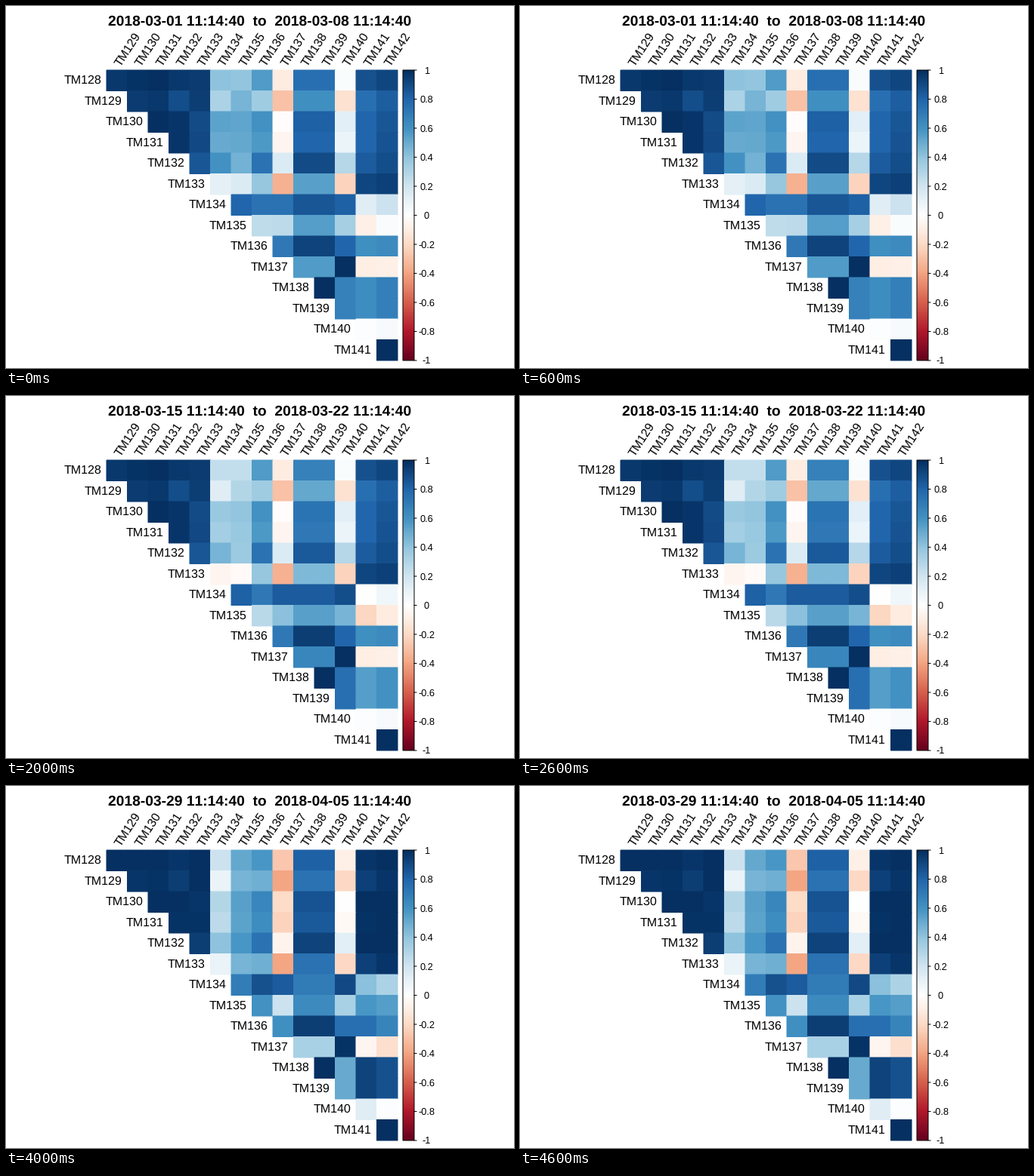
A matplotlib script for the animation above (5 s loop, 672x480 px).

```python
import numpy as np
import matplotlib.pyplot as plt
from matplotlib.animation import FuncAnimation
from matplotlib.colors import LinearSegmentedColormap
from matplotlib.patches import Rectangle

plt.rcParams.update({
    "font.family": "Liberation Sans",
    "text.hinting": "none",
    "text.kerning_factor": 16,
})

W, H, DPI = 672, 480, 96
N, CELL, WEEKS = 14, 27.5, 5
LEFT, TOP = 133, 85
RIGHT, BOTTOM = LEFT + N * CELL, TOP + N * CELL
BAR_L, BAR_R = 525, 540
TILT = 57

CMAP = LinearSegmentedColormap.from_list("RdBu11", [
    "#67001F", "#B2182B", "#D6604D", "#F4A582", "#FDDBC7", "#FFFFFF",
    "#D1E5F0", "#92C5DE", "#4393C3", "#2166AC", "#053061"], N=200)

# Each sensor is a unit vector (bearing in degrees, height);
# the correlation of two sensors is their dot product.
BEARING = np.array([-6, -16, 0, -2, 9, -22, 56, 34, 49, 91, 35, 35, 83, -10, -8])
HEIGHT = np.array([-12, 7, 0, 0, -13, -25, 30, 77, -40, -10, -10, -10, -10, -59, -50]) / 100
FINAL = np.array([-5, -12, 0, -2, 7, -12, 72, 31, 49, 101, 30, 30, 90, 8, 1])
DRIFT = np.zeros(N + 1)
DRIFT[[6, 7, 10, 11]] = 5.5, 9, 3.5, 3.5


def correlations(week):
    """Drift that slows down, then a jump in the last week."""
    if week < WEEKS - 1:
        angle, z = BEARING + DRIFT * min(week, 2.5), HEIGHT
    else:
        angle, z = FINAL, np.where(HEIGHT > 0.2, HEIGHT, 0)
    a, r = np.radians(angle), np.sqrt(1 - z ** 2)
    v = np.stack([r * np.cos(a), r * np.sin(a), z])
    grid = (v.T @ v)[:-1, 1:]
    return np.ma.masked_where(np.tri(N, k=-1) > 0, grid)


fig = plt.figure(figsize=(W / DPI, H / DPI), dpi=DPI, facecolor="white")
ax = fig.add_axes([0, 0, 1, 1])
ax.axis("off")


def label(x, y, text, px, **kw):
    return ax.text(x, y, text, fontsize=px * 72 / DPI, color="black", **kw)


edges = np.arange(N + 1) * CELL
cells = ax.pcolormesh(LEFT + edges, TOP + edges, correlations(0), cmap=CMAP,
                      vmin=-1, vmax=1, edgecolors="face", linewidth=0.75,
                      antialiased=True, snap=False)

ax.imshow(np.linspace(1, -1, 200)[:, None], cmap=CMAP, vmin=-1, vmax=1,
          extent=(BAR_L, BAR_R, BOTTOM, TOP), interpolation="nearest",
          aspect="auto")
ax.add_patch(Rectangle((BAR_L, TOP), BAR_R - BAR_L, BOTTOM - TOP,
                       fill=False, ec="black", lw=0.75, snap=False))

for i in range(11):
    y = TOP + i * (BOTTOM - TOP) / 10
    ax.plot([BAR_R, BAR_R + 3], [y, y], color="black", lw=0.75, snap=False)
    label(556.5, y + 4.5, f"{(5 - i) / 5:g}", 12.8, ha="center")

tilt = np.radians(TILT)
for i in range(N):
    x, y = LEFT + i * CELL, TOP + i * CELL
    label(x - 7, y + CELL / 2 + 4.3, f"TM{128 + i}", 16, ha="right")
    label(x + CELL / 2 + 5.5 * np.sin(tilt), 78 + 5.5 * np.cos(tilt),
          f"TM{129 + i}", 16, rotation=TILT, rotation_mode="anchor")

title = label(W / 2, 25.5, "", 19.3, weight="bold", ha="center")
ax.set(xlim=(0, W), ylim=(H, 0))


def draw(week):
    start = np.datetime64("2018-03-01") + 7 * week
    title.set_text(f"{start} 11:14:40  to  {start + 7} 11:14:40")
    cells.set_array(correlations(week))
    return cells, title


anim = FuncAnimation(fig, draw, frames=WEEKS, interval=1000, repeat=True)
plt.show()
```
